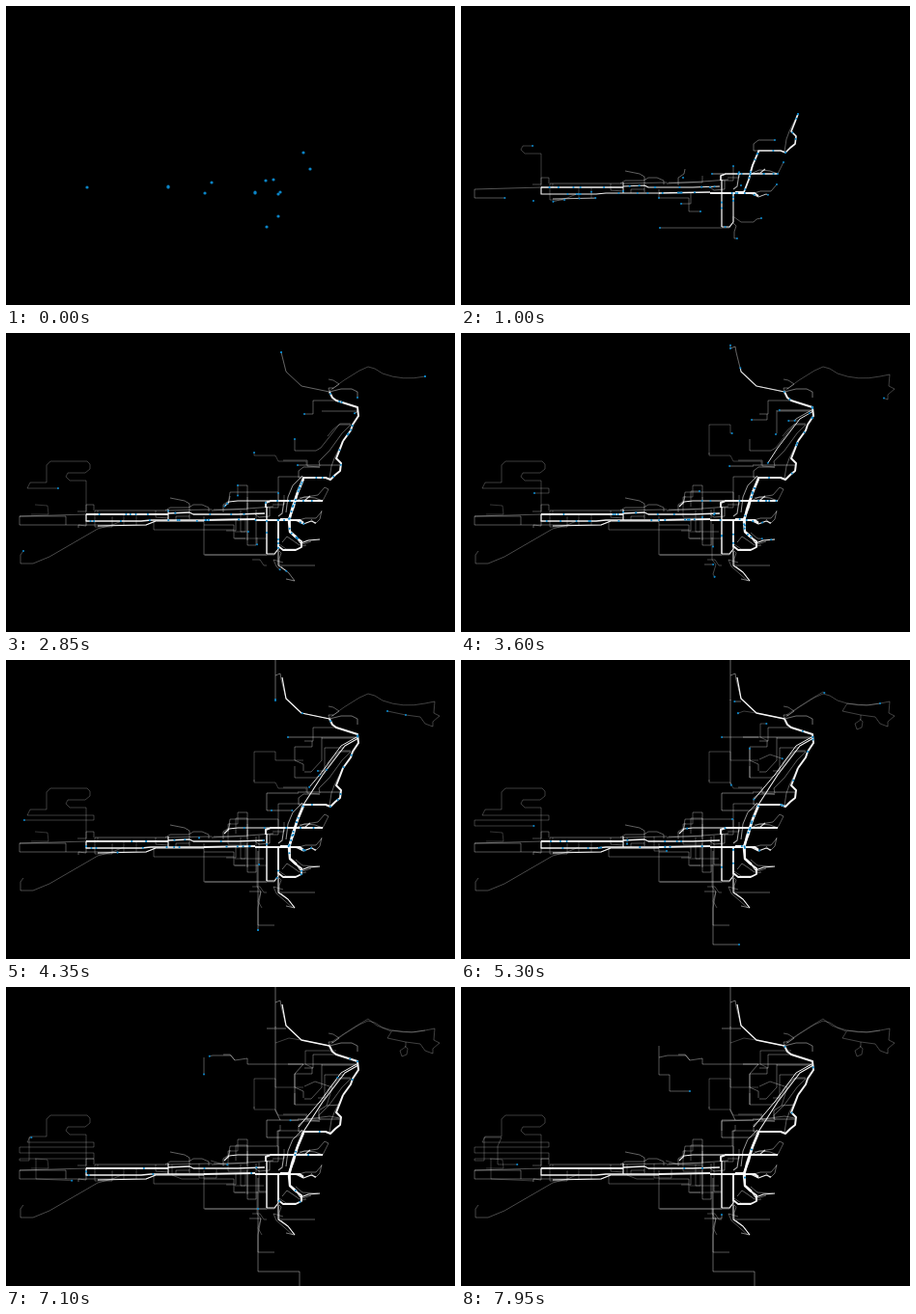
Animation, 465 px wide and 310 px high, one loop 8000 ms. Source, as an HTML page with a canvas:

```html
<!DOCTYPE html>
<html lang="en">
<head>
<meta charset="utf-8">
<style>
  html, body { margin: 0; width: 100%; height: 100%; overflow: hidden; background: #000; }
  canvas { display: block; width: 465px; height: 310px; }
</style>
</head>
<body>
<canvas id="stage" width="465" height="310"></canvas>
<script>
const LOOP = 8, STEP = 0.05;
const ctx = document.getElementById('stage').getContext('2d');
const routes = [], vehicles = [];

let seed = 11;
function random() {
  seed = (seed * 16807) % 2147483647;
  return seed / 2147483647;
}

function measure(d) {
  const node = document.createElementNS('http://www.w3.org/2000/svg', 'path');
  node.setAttribute('d', d);
  return { node, length: node.getTotalLength(), shape: new Path2D(d) };
}

// A trip leaves its trace from time `start` to `end` (seconds).
function route(start, end, d, light = 0.36, width = 0.8) {
  const item = { ...measure(d), start, end, light, width };
  routes.push(item);
  return item;
}

// A busy road: its trace brightens and widens, and vehicles shuttle along it.
function trunk(start, end, d, width, count) {
  const item = route(start, end, d, 0.95, width);
  item.busy = true;
  for (let i = 0; i < count; i++) {
    vehicles.push({
      road: item,
      phase: random() * 2,
      speed: (random() < 0.5 ? -1 : 1) * (35 + 30 * random()),
      from: start + 0.15 + 0.7 * random(),
      until: 1.5 + 7 * random()
    });
  }
}

// West side
route(0, 2, 'M84 188 14 190V199H95L145 199 155 195', 0.42);
route(0.05, 8, 'M83 188V153H66L62 149 64 145H82L87 141V136L84 133H46L42 137V155H25L22 161H91V166H14V172H91V178H14V180H24V156H42L38 165V184H62', 0.3);
route(0.5, 2.85, 'M122 194 110 199 95 203 45 232 28 239H15V230L18 226', 0.36);
route(2, 2.8, 'M30 178 43 179 44 188H26', 0.26);
route(0.2, 0.7, 'M74 185H83V178H91V184', 0.36);
route(0.3, 1.3, 'M92 184V201H110V190', 0.34);
route(1, 1.9, 'M75 202V199L83 200V194', 0.45);
route(0.4, 1.2, 'M95 184V189M122 199V189M135 189V199', 0.3);
route(1.3, 2.2, 'M62 199V190H14', 0.4);
route(5.4, 7.3, 'M31 178V199L75 201', 0.28);

// Main east-west roads
trunk(0, 0.8, 'M168 188H83', 2, 5);
trunk(0, 0.85, 'M168 187 190 186 194 188H240L268 187', 1.3, 7);
trunk(0, 0.9, 'M206 194H150L140 195H83V188', 1.3, 7);
trunk(0, 0.9, 'M258 193 205 194', 1.8, 5);
trunk(0, 0.5, 'M258 194H296L304 194 308 197', 2.2, 4);
trunk(0, 0.9, 'M269 181V176L274 174H328', 2, 5);
trunk(0.8, 1.6, 'M272 174H240L231 175 226 180', 1.1, 3);
trunk(0.6, 1.6, 'M95 200 145 199 155 195H205', 1.2, 2);
trunk(0.3, 0.7, 'M168 183V194', 1.2, 2);
route(0, 0.9, 'M213 183 165 184H92', 0.45);
route(0, 0.85, 'M277 180 250 182 213 184', 0.5);

// Inner streets
route(0.1, 0.8, 'M170 171 185 174 190 177V193', 0.48);
route(0.2, 0.8, 'M165 184 170 181H189L194 178H203L210 181V185', 0.45);
route(0.5, 1, 'M155 184V191L168 192', 0.4);
route(0.4, 0.9, 'M190 190H176V194', 0.4);
route(0.3, 0.9, 'M225 186V178L231 174 232 169', 0.48);
route(1, 1.7, 'M230 178 232 165H282V174', 0.42);
route(0.3, 1, 'M205 190V199H236V213H248', 0.4);
route(0.4, 1, 'M238 194V205H228', 0.4);
route(1, 1.8, 'M205 199V230H270', 0.4);
route(1.1, 2, 'M236 204H153V195', 0.35);
route(0.2, 0.9, 'M215 183H250V176', 0.38);
route(1.1, 2, 'M250 215V170', 0.4);
route(1.4, 2.3, 'M259 183V220H250V190', 0.42);
route(1.2, 2.1, 'M237 206H248V194M237 213H270', 0.32);
route(2.2, 2.85, 'M250 182V158H240', 0.42);
route(2.7, 3.6, 'M240 158V170H230V191H250', 0.35);
route(3, 4.2, 'M238 180V164H250V186', 0.38);
route(3.4, 4.6, 'M262 182V212H270', 0.4);
route(2.2, 3.2, 'M243 184V206H267', 0.36);
route(4.3, 5.8, 'M200 183V198H218V189', 0.34);
route(5, 6.8, 'M172 184V195L182 199H200', 0.34);
route(6.5, 7.9, 'M212 180 225 184 250 185V188', 0.34);
route(0.3, 1, 'M273 181V190L262 191 258 188', 0.5);
route(0.5, 1, 'M270 181H282V166', 0.42);
route(0.4, 0.9, 'M288 174 286 187 282 190', 0.65, 1.1);
route(0.6, 1.1, 'M276 178H288V168', 0.4);

// South
trunk(0, 0.8, 'M270 229V194L270 180', 1.5, 2);
trunk(0, 0.9, 'M282 195V224L278 229H270', 1.2, 2);
trunk(0.9, 2, 'M282 194V221L287 225H300L306 222V216L299 211 294 206V194', 1.8, 4);
route(0, 0.95, 'M282 218V224L278 230H206', 0.42);
route(0.3, 0.95, 'M283 219 290 224H303L306 221 311 220', 0.42);
route(0.4, 2, 'M282 225 285 228 283 234V241H320', 0.45);
route(1.1, 2, 'M285 242 293 249 299 257 290 255', 0.6);
trunk(2.2, 3.2, 'M282 226V241L292 248 299 257', 1.1, 1);
route(1.2, 2, 'M255 235H263L267 241H270', 0.35);
route(2.4, 3.2, 'M287 238 277 235 280 242 297 257', 0.4);
route(2.7, 3.7, 'M260 212V235L264 240 261 250 265 257', 0.35);
route(3.3, 4.35, 'M261 198V280', 0.48);
route(3.5, 4.2, 'M252 240H264L261 257V275H278', 0.42);
route(4.35, 6, 'M261 280V295H304V310', 0.48);
route(7.1, 7.95, 'M261 230V240H270V236', 0.5);

// Peninsulas
route(0, 0.4, 'M315 169 310 173 300 174', 0.8, 1.2);
route(0.2, 0.95, 'M300 174 309 170 320 171 328 174', 0.55);
route(0.3, 0.95, 'M328 174 334 162', 0.42);
route(1.1, 1.9, 'M334 162 330 160 323 168 304 171', 0.48);
route(0.2, 0.95, 'M300 195 310 192H321L327 185', 0.5);
trunk(0.4, 1.1, 'M300 194 308 198 316 195 321 197', 1.1, 2);
route(1.3, 2, 'M327 184 325 193 320 198 316 193', 0.5);
trunk(1.4, 2, 'M300 211 305 218 313 215 325 214', 1.2, 2);
route(2, 2.8, 'M286 217 291 211 297 215 304 220 316 216', 0.5);
route(3.1, 4, 'M300 207 307 213 323 214', 0.45);

// Shore road
trunk(0, 1, 'M308 152V150H331L336 152 341 147 346 143 347 135 342 130 346 120 349 112', 2, 6);
trunk(0, 0.7, 'M284 193H293L298 180 302 165 308 151', 2.2, 6);
trunk(0.8, 1.4, 'M308 151 301 168 296 183 293 196 294 206 301 212', 2.4, 9);
trunk(1, 2, 'M349 112 357 101 359 95 365 86 364 77 342 70 338 67 335 61', 2, 7);
route(0.3, 1, 'M308 150H303V143L308 139H325', 0.48);
route(0.4, 1, 'M335 151 337 138 340 130 349 112', 0.45);
route(1.1, 2, 'M325 139 312 138V132H287', 0.38);
route(1.1, 1.8, 'M325 138 324 133 335 122 348 104', 0.45);
route(1.2, 2, 'M357 94H346L339 100 333 107', 0.38);
route(1, 1.7, 'M290 186 292 170 297 158 307 148', 0.6, 1);

// North
route(1.8, 2.85, 'M335 61 306 55 290 40 285 20', 0.5);
route(2.85, 4.25, 'M285 20 284 14 279 16V0', 0.5);
trunk(3, 3.8, 'M335 61 306 55 290 40 286 18', 1.3, 1);
route(1.98, 2.85, 'M335 60 350 49 366 39 375 35 382 37 390 42Q411 50 434 45', 0.32);
route(2.85, 4.35, 'M434 45 444 43 443 55 449 58 442 64V69L434 66 429 59 414 57 395 53', 0.32);
route(4.35, 5.3, 'M414 57V62L408 66 410 72 415 70 416 64 413 61M395 53 400 45 420 47 434 45', 0.3);
route(4.4, 5.8, 'M337 57 360 42 375 33 384 40 399 46', 0.3);
route(1.5, 2, 'M335 61 334 57 339 57', 0.45);
route(2.1, 2.8, 'M338 58 345 53 339 49 334 48', 0.42);
route(2.2, 2.85, 'M335 61 347 58 358 58 364 61V67', 0.55);
route(2, 2.85, 'M342 70H318V84H309', 0.42);
route(2.2, 2.8, 'M365 81H327', 0.42);
route(2, 2.85, 'M348 104 357 95H345L326 119 321 122H299V110', 0.4);
route(2, 2.85, 'M311 137V133H282L279 127H257V124', 0.3);
route(2.9, 3.9, 'M257 126V95H279V104H308', 0.32);
route(2.2, 2.85, 'M308 149H282V166', 0.4);
route(2.3, 2.85, 'M346 137H302', 0.5);
trunk(2.8, 3.8, 'M365 81 351 89 328 119 308 150', 1.1, 2);
trunk(3.3, 4.6, 'M363 80 347 89 325 119 303 145', 1, 1);
route(2.9, 4.2, 'M327 80V104L316 116H309', 0.42);
route(2.9, 4.35, 'M365 80H292', 0.55);
route(3.2, 4.2, 'M317 84V90H299V104L308 108V115', 0.42);
route(3.4, 4.35, 'M350 91 330 91V115H323', 0.4);
route(3, 4.35, 'M303 138H270V156H275', 0.5);
route(3.8, 4.7, 'M275 156H300L308 150', 0.5);
route(3.6, 4.35, 'M279 16V42', 0.5);
route(4.35, 5.4, 'M279 41V128L284 138', 0.52);
route(4.7, 5.6, 'M299 122V90L308 80', 0.5);
route(5, 5.9, 'M290 43H270', 0.5);
route(4.6, 5.6, 'M306 55 293 53 279 58', 0.3);
route(4.6, 6.3, 'M308 80H250V74L237 76 232 70H225', 0.45);
route(6.3, 7.6, 'M237 76 233 71 214 71 205 73V61', 0.45);
route(6.8, 7.95, 'M205 73V91H216V108H237', 0.42);
route(5.3, 6.3, 'M281 165V149H284V143', 0.4);
route(6.2, 7.7, 'M346 136 335 134 303 138 270 139V149', 0.45);
route(5.6, 7, 'M324 137V128L332 123 346 122', 0.5);
route(4.6, 6, 'M309 103 320 98 338 104 332 123', 0.4);
route(4.5, 6, 'M318 84 310 80V66H342', 0.35);

const clamp = value => Math.max(0, Math.min(1, value));
const progress = (item, time) => clamp((time - item.start) / (item.end - item.start));

function drawTrace(item, time) {
  if (time <= item.start) return;
  const age = time - item.start;
  const growth = item.busy ? clamp(0.3 + age / 2.5) : 1;
  ctx.globalAlpha = item.light * (item.busy ? clamp(0.55 + age * 0.5) : 1);
  ctx.lineWidth = 0.8 + (item.width - 0.8) * growth;
  ctx.setLineDash([item.length * progress(item, time), 9999]);
  ctx.stroke(item.shape);
}

function drawDot(item, distance, radius) {
  const { x, y } = item.node.getPointAtLength(distance);
  ctx.beginPath();
  ctx.arc(x, y, radius, 0, Math.PI * 2);
  ctx.fill();
}

function draw(time) {
  ctx.globalAlpha = 1;
  ctx.fillStyle = '#000';
  ctx.fillRect(0, 0, 465, 310);
  ctx.strokeStyle = '#fff';
  ctx.lineJoin = 'round';
  for (const item of routes) drawTrace(item, time);

  ctx.globalAlpha = 1;
  ctx.fillStyle = '#0b84c6';
  const radius = time < STEP ? 1.6 : 1.05;
  for (const item of routes) {
    if (time >= item.start && time <= item.end + 0.05) {
      drawDot(item, item.length * progress(item, time), radius);
    }
  }
  for (const { road, phase, speed, from, until } of vehicles) {
    if (time < from || time > until) continue;
    const turn = (((phase + speed * time / road.length) % 2) + 2) % 2;
    const place = turn > 1 ? 2 - turn : turn;
    if (place <= progress(road, time)) drawDot(road, place * road.length, radius);
  }
}

const origin = performance.now();
function frame() {
  const elapsed = ((performance.now() - origin) / 1000) % LOOP;
  draw(Math.floor(elapsed / STEP + 1e-6) * STEP);
  requestAnimationFrame(frame);
}
frame();
</script>
</body>
</html>
```
